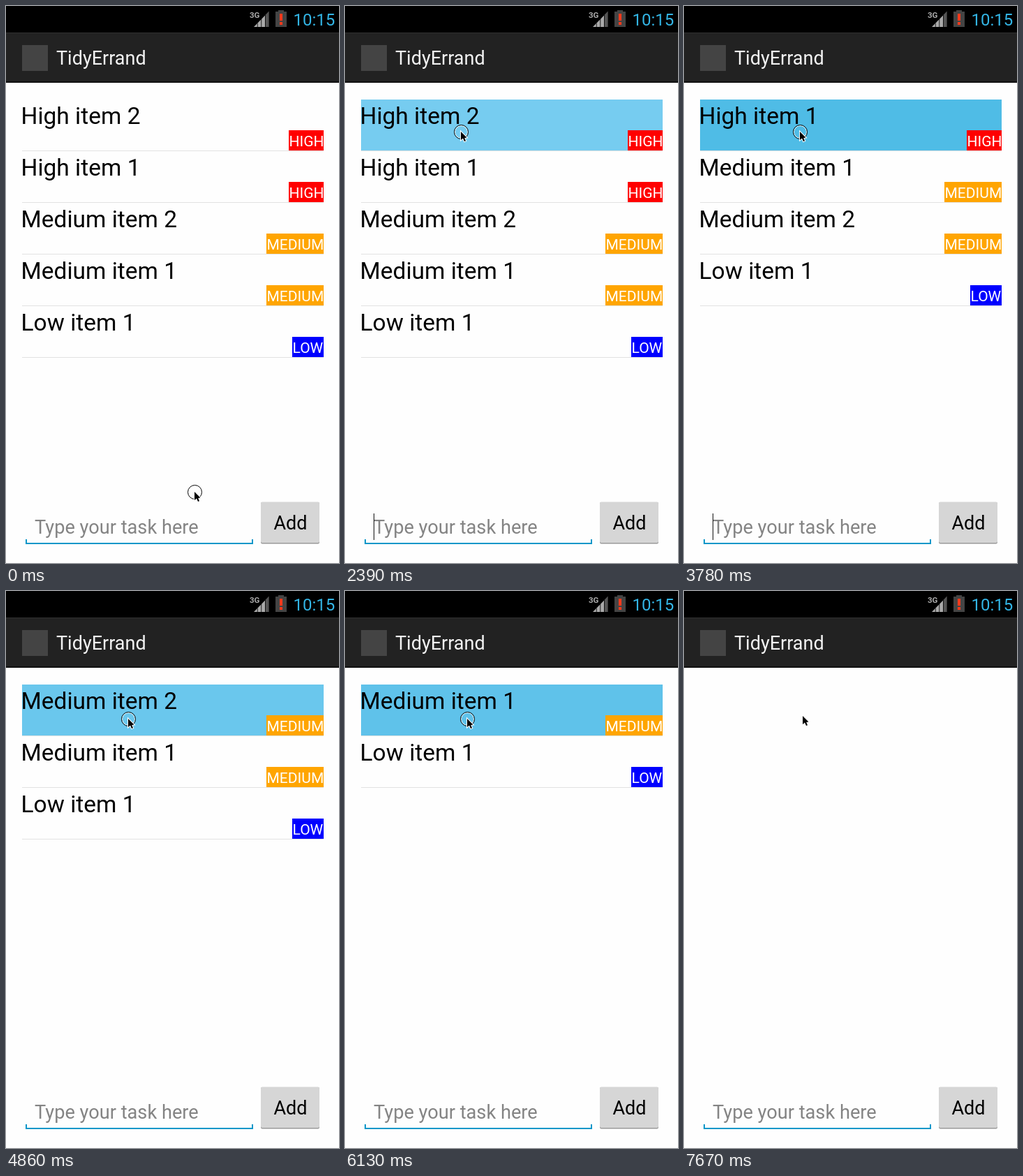
An HTML page with a canvas that plays this animation: 477 by 798 pixels, repeating every 8 s.

```html
<!DOCTYPE html>
<html lang="en">
<head>
<meta charset="utf-8">
<title>Todo list</title>
<style>
  html, body { margin: 0; width: 100%; height: 100%; overflow: hidden; background: #fefefe; }
  canvas { display: block; }
</style>
</head>
<body>
<canvas width="477" height="798"></canvas>
<script>
const ctx = document.querySelector('canvas').getContext('2d');
const LOOP = 8000, ROW = 74;
const TAP_DELAY = 220, LONG_PRESS = 500, RELEASE = 515;
const BLINK_START = 405, BLINK = 483.5;

const KINDS = {
  H: { name: 'High', color: '#f00', width: 50 },
  M: { name: 'Medium', color: '#ffa500', width: 82 },
  L: { name: 'Low', color: '#00f', width: 45 },
};

// A long press on the first row of each list removes it
const stages = [
  { items: 'H2 H1 M2 M1 L1', press: 2360 },
  { items: 'H1 M1 M2 L1', press: 3550 },
  { items: 'M2 M1 L1', press: 4770 },
  { items: 'M1 L1', press: 5980 },
  { items: 'L1', press: 7150 },
];

const home = { x: 270, y: 696 };
const moves = [
  { at: 240, ms: 60, x: 311, y: 702 },
  { at: 300, ms: 350, x: 180, y: 225 },
  { at: 800, ms: 210, x: 170, y: 180 },
  { at: 1150, ms: 140, x: 161, y: 223 },
  { at: 1670, ms: 480, x: 166, y: 180 },
  { at: 4200, ms: 360, x: 175, y: 183 },
  { at: 6600, ms: 270, x: 170, y: 179 },
];

const arrow = new Path2D('M0 0V12L3 9.5L5 14L7 13.2L5.2 9L8.5 8.5Z');

const clamp = v => Math.min(1, Math.max(0, v));
const ease = p => p * p * (3 - 2 * p);
const mix = (a, b, p) => a + (b - a) * p;

function rect(color, x, y, w, h, radius = 0) {
  ctx.fillStyle = color;
  ctx.beginPath();
  ctx.roundRect(x, y, w, h, radius);
  ctx.fill();
}

function text(str, x, y, size, color, weight = 400) {
  ctx.font = `${weight} ${size}px Roboto, sans-serif`;
  ctx.fillStyle = color;
  ctx.fillText(str, x, y);
}

function ring(color, x, y, r) {
  ctx.strokeStyle = color;
  ctx.lineWidth = 1;
  ctx.beginPath();
  ctx.arc(x, y, r, 0, 7);
  ctx.stroke();
}

function drawSignal() {
  text('3G', 349, 17, 11.5, '#aaa', 700);
  for (let i = 0; i < 4; i++) {
    const x = 355 + i * 5.6, top = 30 - i * 5.8;
    ctx.fillStyle = i < 3 ? '#aaa' : '#555';
    ctx.fill(new Path2D(`M${x} 30V${top}l4.8 -5V30Z`));
  }
}

function drawBars() {
  rect('#000', 0, 0, 477, 38);
  drawSignal();
  rect('#444', 390, 6, 8, 3);
  rect('#444', 386, 8, 16, 22);
  rect('#ff3a1c', 392, 11, 4, 10);
  rect('#ff3a1c', 392, 23, 4, 4);
  text('10:15', 411.5, 28, 24, '#33b5e5');

  rect('#222', 0, 38, 477, 72);
  rect('#303030', 0, 38, 477, 1);
  rect('#111', 0, 108, 477, 2);
  rect('#444', 23, 56, 37, 37);
  text('TidyErrand', 72, 84, 27, '#f3f3f3');
}

function drawForm(t) {
  text('Type your task here', 41, 756, 27.2, '#848484');
  rect('#0d97c9', 28, 769, 326, 2);
  for (const x of [28, 352]) rect('#0d97c9', x, 764, 2, 6);
  const caretOn = Math.floor((t - BLINK_START) / BLINK) % 2 === 0;
  if (caretOn) rect('#111', 41, 727, 1, 38);

  rect('#999', 365, 711, 84, 59.5, 2);
  rect('#d6d6d6', 365, 710.5, 84, 58.5, 2);
  text('Add', 383.5, 750, 27, '#000');
}

function drawList(stage, t) {
  stage.items.split(' ').forEach(([letter, number], i) => {
    const { name, color, width } = KINDS[letter];
    const y = 134 + i * ROW, badgeX = 455 - width;
    rect('#e2e2e2', 23, y + 73, 432, 1);
    if (i === 0 && t >= stage.press) {
      const p = clamp((t - stage.press) / LONG_PRESS);
      rect(`rgb(${mix(124, 27, p)},${mix(207, 165, p)},${mix(242, 216, p)})`, 23, y, 432, 73);
    }
    text(`${name} item ${number}`, 21.5, y + 35, 33.5, '#000');
    rect(color, badgeX, y + 44, width, 29);
    text(name.toUpperCase(), badgeX + 0.5, y + 67, 21, '#fff');
  });
}

function drawPointer(t, touching) {
  let { x, y } = home;
  for (const move of moves) {
    const p = ease(clamp((t - move.at) / move.ms));
    x = mix(x, move.x, p);
    y = mix(y, move.y, p);
  }
  ctx.save();
  ctx.translate(Math.round(x), Math.round(y));
  if (touching) {
    ring('#fff', 0.5, 0.5, 9);
    ring('#000', 0.5, 0.5, 10);
  }
  ctx.strokeStyle = '#fff';
  ctx.lineWidth = 2;
  ctx.stroke(arrow);
  ctx.fillStyle = '#000';
  ctx.fill(arrow);
  ctx.restore();
}

function draw(t) {
  rect('#fefefe', 0, 0, 477, 798);
  drawBars();
  drawForm(t);
  const stage = stages.find(s => t < s.press + RELEASE);
  if (stage) drawList(stage, t);
  drawPointer(t, t < 60 || (stage && t >= stage.press - TAP_DELAY));
}

const start = performance.now();
function tick() {
  draw((performance.now() - start) % LOOP);
  requestAnimationFrame(tick);
}
tick();
</script>
</body>
</html>
```
